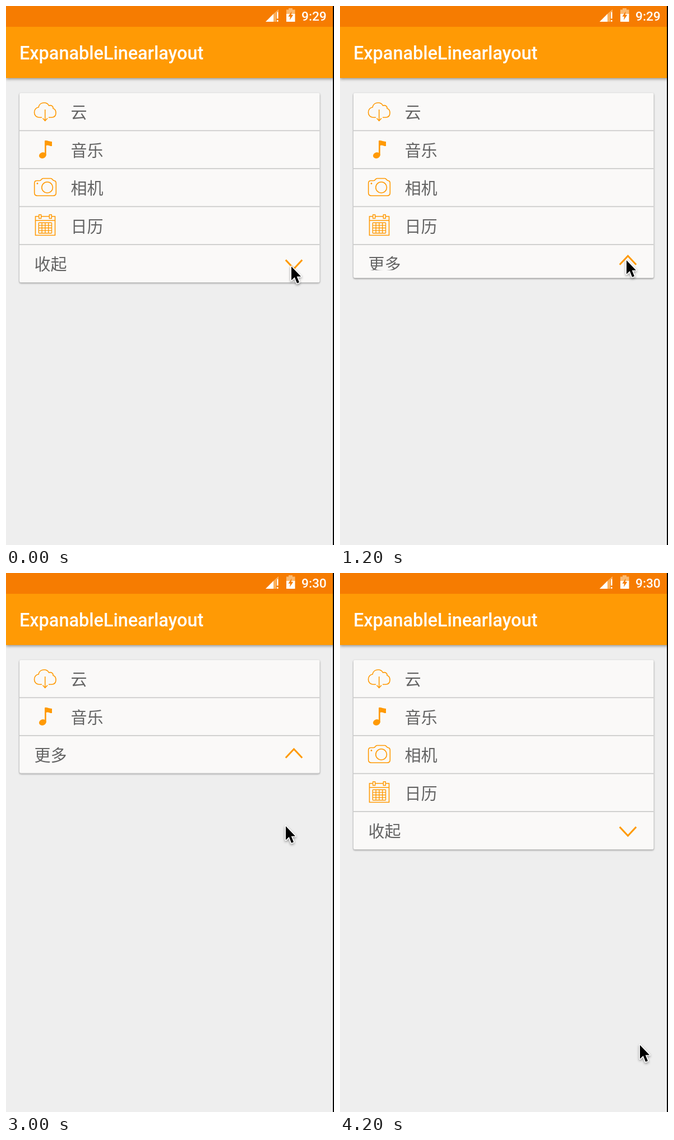
An HTML page with a canvas that plays this animation: 585 px wide and 958 px high, repeating every 4.8 s.

```html
<!DOCTYPE html>
<html lang="zh-CN">
<head>
<meta charset="utf-8">
<title>ExpanableLinearlayout</title>
<style>
html, body { margin: 0; width: 100%; height: 100%; overflow: hidden; background: #eee; }
canvas { display: block; }
</style>
</head>
<body>
<canvas id="stage" width="585" height="958"></canvas>
<script>
const ctx = document.getElementById('stage').getContext('2d');
const STEP = 600;
const ORANGE = '#ff9a05';
const LEFT = 24, RIGHT = 559.5, TOP = 154.5, ROW = 67.5;
const FULL = 491.5, CLOSED = 356;

const poses = [
  { bottom: FULL, pointer: [509, 462], clock: '9:29' },
  { bottom: FULL, pointer: [511, 451], clock: '9:29' },
  { bottom: 483.5, pointer: [511, 451], clock: '9:29', closing: true },
  { bottom: CLOSED, pointer: [519, 342], clock: '9:29' },
  { bottom: FULL, pointer: [499, 449], clock: '9:29' },
  { bottom: CLOSED, pointer: [499, 449], clock: '9:30' },
  { bottom: 366.5, pointer: [521, 335], clock: '9:30' },
  { bottom: FULL, pointer: [535, 838], clock: '9:30' }
];

function rect(color, x, y, w, h) {
  ctx.fillStyle = color;
  ctx.fillRect(x, y, w, h);
}

function polygon(color, points) {
  ctx.beginPath();
  points.forEach(([x, y]) => ctx.lineTo(x, y));
  ctx.closePath();
  ctx.fillStyle = color;
  ctx.fill();
}

function outline(path, width = 1.6) {
  ctx.strokeStyle = ORANGE;
  ctx.lineWidth = width;
  ctx.stroke(new Path2D(path));
}

function text(value, x, y, font, color) {
  ctx.font = font;
  ctx.fillStyle = color;
  ctx.fillText(value, x, y);
}

function label(value, x, y) {
  text(value, x, y, '29px "Noto Sans CJK SC", "Noto Sans CJK", sans-serif', '#646464');
}

function shadow(color, blur, dy) {
  ctx.shadowColor = color;
  ctx.shadowBlur = blur;
  ctx.shadowOffsetY = dy;
}

function cloud() {
  outline('M64 198H60C53 198 50.5 193 50.5 189C50.5 184 54 180.5 58 180' +
    'C59 174.5 63.5 172 68 172C72.5 172 75 174 76.5 177' +
    'C81 175.5 84.5 178.5 84 182C87 183 89 186 89 190C89 195 86 198 81 198H76');
  outline('M69.7 184V203M65.5 199.5L69.7 204L74 199.5');
}

function note() {
  ctx.fillStyle = ORANGE;
  ctx.beginPath();
  ctx.ellipse(65.3, 265.5, 6.4, 5.3, -0.35, 0, 7);
  ctx.fill();
  ctx.fill(new Path2D('M69 239.5C73 238 77 241.5 82 241V249C78 249.5 75 246 71.7 248V266H69Z'));
}

function camera() {
  outline('M55 310.5H60C63 310.5 63 306.5 66 306.5H80C83 306.5 83 310.5 86 310.5' +
    'Q89.3 311 89.3 315V332Q89.3 337.2 84 337.2H56Q50.7 337.2 50.7 332V315Q50.7 310.5 55 310.5Z');
  ctx.beginPath();
  ctx.arc(73.6, 322.5, 9.8, 0, 7);
  ctx.stroke();
  ctx.beginPath();
  ctx.arc(56, 315.5, 1.4, 0, 7);
  ctx.fillStyle = ORANGE;
  ctx.fill();
}

function calendar() {
  outline('M58.5 374H52.5V407.5H87.5V374H81.5M63 374H77M52.5 381.3H87.5');
  outline('M58.7 371H62.7V377.5H58.7ZM77.3 371H81.3V377.5H77.3Z', 1.4);
  for (let i = 0; i < 5; i++) {
    const x = 58.3 + i * 5.8, y = 385.3 + i * 4.6;
    outline(`M${x} 385.3V403.7M58.3 ${y}H81.5`, 1.4);
  }
}

function divider(y) {
  rect('#c8c8c8', LEFT, y, RIGHT - LEFT, 1.6);
}

function statusBar(clock) {
  rect('#f67c01', 0, 0, 585, 37);
  polygon('#fbb15e', [[477, 14], [486, 6], [486, 11], [482, 11], [482, 28], [477, 28]]);
  polygon('#fff', [[463, 28], [477, 14], [477, 28]]);
  rect('#fff', 483, 11, 2.6, 11.5);
  rect('#fff', 483, 25, 2.6, 2.8);
  rect('#fbb96f', 504, 4, 7, 3);
  rect('#fbb96f', 500, 6.5, 15.5, 8);
  rect('#fff', 500, 14, 15.5, 14);
  polygon('#f67c01', [[509.5, 9.5], [503.5, 18.8], [507, 18.8], [506, 25], [512.3, 15.7], [508.8, 15.7]]);
  text(clock, 527, 25.5, '500 22.7px Roboto, sans-serif', '#fff');
}

function appBar() {
  ctx.save();
  shadow('rgba(0,0,0,.38)', 5, 2);
  rect(ORANGE, 0, 37, 585, 91);
  ctx.restore();
  text('ExpanableLinearlayout', 24, 95, '500 32.4px Roboto, sans-serif', '#fff');
}

function chevron(y, up) {
  const d = up ? -7.8 : 7.8;
  outline(`M498.8 ${y - d}L513.5 ${y + d}L528.2 ${y - d}`, 3);
}

function footer({ bottom, closing }) {
  const top = bottom === CLOSED ? TOP + 2 * ROW : TOP + 4 * ROW;
  const folded = closing || bottom === CLOSED;
  ctx.save();
  ctx.beginPath();
  ctx.rect(LEFT, top, RIGHT - LEFT, closing ? 469.5 - top : ROW);
  ctx.clip();
  label(folded ? '更多' : '收起', 50.5, top + 45.7);
  ctx.restore();
  chevron((top + bottom) / 2 + (folded ? -2 : 1.2), folded);
}

function card(pose) {
  const { bottom } = pose;
  ctx.save();
  ctx.beginPath();
  ctx.roundRect(LEFT, TOP, RIGHT - LEFT, bottom - TOP, 3);
  ctx.save();
  shadow('rgba(0,0,0,.45)', 3, 1.3);
  ctx.fillStyle = '#faf9f8';
  ctx.fill();
  ctx.restore();
  ctx.clip();

  const rows = [['云', cloud], ['音乐', note], ['相机', camera], ['日历', calendar]];
  const shown = bottom === CLOSED ? 2 : 4;
  rows.slice(0, shown).forEach(([name, icon], i) => {
    label(name, 115.5, 200.2 + i * ROW);
    icon();
    divider(TOP + (i + 1) * ROW - 1.3);
  });
  footer(pose);
  ctx.restore();
  if (bottom === FULL || bottom === CLOSED) divider(bottom - 0.5);
}

function pointer([x, y]) {
  ctx.save();
  ctx.translate(x, y);
  const arrow = new Path2D('M0 1V25.5L5.8 20L10 30.8L14 29.2L9.7 18.7H17Z');
  ctx.strokeStyle = '#fff';
  ctx.lineWidth = 3.2;
  ctx.lineJoin = 'round';
  shadow('rgba(0,0,0,.4)', 4, 2);
  ctx.stroke(arrow);
  shadow('transparent', 0, 0);
  ctx.fillStyle = '#000';
  ctx.fill(arrow);
  ctx.restore();
}

function draw(now) {
  const pose = poses[Math.floor(now / STEP) % poses.length];
  rect('#eee', 0, 0, 585, 958);
  appBar();
  statusBar(pose.clock);
  card(pose);
  rect('#000', 583, 0, 2, 958);
  pointer(pose.pointer);
}

let start;
function tick(now) {
  start ??= now;
  draw(now - start);
  requestAnimationFrame(tick);
}
draw(0);
requestAnimationFrame(tick);
</script>
</body>
</html>
```
